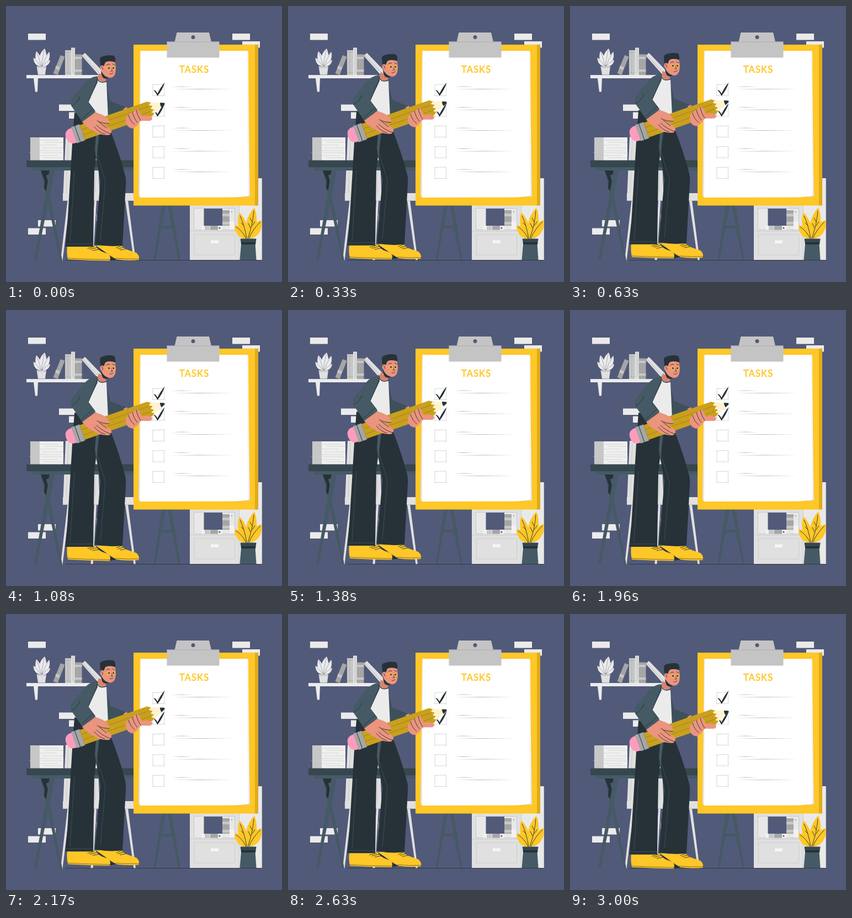
Recreate the animation shown at these times as an HTML page. Size 500 by 500 pixels, loop 3040 ms.

```html
<!DOCTYPE html>
<html lang="en">
<head>
<meta charset="utf-8">
<title>Tasks</title>
<style>
  html, body { margin: 0; width: 100%; height: 100%; overflow: hidden; background: #525a79; }
  svg { display: block; width: 100vw; height: 100vh; }
  .line { fill: none; stroke: #263238; stroke-width: .9; stroke-linecap: round; stroke-linejoin: round; }
  .seam { fill: none; stroke: #455a64; stroke-width: .7; }
  .title {
    font: 400 16.4px Lato, "Open Sans", sans-serif; letter-spacing: 1.2px;
    fill: #ffc727; stroke: #ffc727; stroke-width: .6; stroke-linejoin: round;
  }
</style>
</head>
<body>
<svg viewBox="0 0 500 500">
  <rect width="500" height="500" fill="#525a79"/>
  <g id="bricks" fill="#ebebeb"></g>

  <!-- Shelf -->
  <path fill="#ebebeb" d="M37 125H172V131H58L57 155.500H53L50 131H37Z"/>
  <path fill="#e0e0e0" d="M55.500 109H73L71 124.500H58Z"/>
  <path fill="#c7c7c7" d="M56 109H72.500L72 112H56.500Z"/>
  <g fill="#ebebeb">
    <path d="M64 109C57 97 60 86 70 77C76 89 72 99 64 109Z"/>
    <path d="M63 109C54 103 51 93 55 82C63 89 65 98 63 109Z"/>
    <path d="M66 109C67 98 71 90 78.500 83C81 94 77 103 66 109Z"/>
    <path d="M63 109C55 109 50 103 49.500 94C57 96 62 101 63 109Z"/>
    <path d="M66 109C68 102 72 98 80 98C79 105 74 110 66 109Z"/>
    <path fill="none" stroke="#8b90a3" stroke-width=".7" d="M64 108Q67 91 69 80M63 108Q60 93 56 85M66 108Q70 95 77 86M62 108Q57 100 51 96M67 108Q72 102 78 99"/>
  </g>
  <path fill="#a6a6a6" d="M85.500 122L99 89L106.500 92L93.500 125Z"/>
  <path fill="#c7c7c7" d="M107 80H118V125H107ZM91 108L98 111L96 116L89 113Z"/>
  <path fill="#e0e0e0" d="M118 75.500H125V125H118Z"/>
  <path fill="#a6a6a6" d="M124.500 87.500H137.500V125H124.500Z"/>
  <path fill="#c7c7c7" d="M124.500 92H137.500V96H124.500ZM124.500 115H137.500V119H124.500Z"/>
  <path fill="#e0e0e0" d="M137 90L143 85L175 118L172 125H168Z"/>
  <path fill="none" stroke="#a6a6a6" stroke-width=".7" d="M107 84H118M107 121H118M121.500 77V123M112 80V125M139 89L171 123"/>

  <!-- Chair -->
  <g fill="#e0e0e0">
    <path d="M108 237H165L170 353H103Z"/>
    <path d="M103 339H232V353H103Z"/>
    <path d="M111.500 352H116L102.500 461H99ZM216 352H221L235 461H231.500ZM160 352H164L157.500 461H153.500Z"/>
  </g>
  <path fill="none" stroke="#bdbdbd" stroke-width=".7" d="M113 240L109 339M103 352.500H231M162 300V338"/>
  <path fill="none" stroke="#e0e0e0" stroke-width=".6" d="M158 374Q167 376 164 390"/>

  <!-- Desk -->
  <path fill="#c7c7c7" d="M44 238H61V280H44Z"/>
  <path fill="#f0f0f0" d="M61 238H104V280H61Z"/>
  <path fill="none" stroke="#c7c7c7" stroke-width=".7" d="M62 243H96M70 247H104M61 252H92M66 257H104M61 262H100M64 266H105M61 271H95M68 275H104M42 265H50"/>
  <path fill="#455a64" d="M46 292H240V298H46ZM63 298H71L102 461H98Z"/>
  <path fill="#263238" d="M63 298H79L77 306H73L80 333L76 340L69 330L70 317Z"/>
  <path fill="#455a64" d="M79 298H88L55.500 461H51Z"/>
  <path fill="#37474f" d="M37 279.500H240V292H37Z"/>
  <path fill="#455a64" d="M284 350H291L271 461H267ZM291 350H298L316 461H312ZM276 398.500H308V403H276Z"/>

  <!-- Cabinet -->
  <path fill="#e0e0e0" d="M333 312H463.500V460H333Z"/>
  <path fill="#e9e9e9" d="M422.500 312H463.500V460H422.500Z"/>
  <path fill="#e8e8e8" stroke="#c0c0c0" stroke-width=".8" d="M340.500 366.500H414.500V405.500H340.500Z"/>
  <path fill="#525a79" d="M358.500 367H392V398H358.500Z"/>
  <path fill="#a6a6a6" d="M392 370H405V398H392Z"/>
  <path fill="#c7c7c7" d="M392 376H405V381H392ZM392 391H405V396H392ZM360 398H369V405.500H360Z"/>
  <path fill="#f2f2f2" d="M405 390H414V405H405ZM354 398H360V405.500H354ZM384 398H392V405.500H384Z"/>
  <path fill="#a6a6a6" d="M370 398H384V405.500H370Z"/>
  <circle cx="387" cy="402" r="1.600" fill="#525a79"/>
  <circle cx="409" cy="373" r="1" fill="#888"/>
  <path fill="none" stroke="#c7c7c7" stroke-width=".8" d="M422.500 360V460M341 414H414.500V451H341ZM333 408H422"/>
  <path fill="#f5f5f5" d="M371 424.500H385V430H371Z"/>

  <path stroke="#263238" stroke-width=".8" d="M107 460.500H463"/>

  <!-- Plant -->
  <g fill="#ffc727">
    <path d="M438 422C430 400 436 380 450 365C458 386 455 406 438 422Z"/>
    <path d="M436 422C420 408 417 389 423 374C435 386 440 402 436 422Z"/>
    <path d="M440 422C440 404 448 392 463.500 388C465 406 457 419 440 422Z"/>
    <path d="M436 422C422 422 414 411 414 397C428 399 436 408 436 422Z"/>
    <path class="line" d="M438 421Q447 397 449 371M436 421Q432 397 424 380M440 421Q447 404 461 391M435 421Q428 407 417 400M443 402L439 394M446 391L442 384M446 398L451 391M431 398L426 393"/>
  </g>
  <path fill="#455a64" d="M426 430H451.500L453.500 460H423.500Z"/>
  <path fill="#37474f" d="M424.500 421.500H453.500L452 432H426Z"/>
  <path fill="#263238" d="M426 428H452V432H426Z"/>

  <!-- Board -->
  <path fill="#deab1c" d="M450 70H457V361.500H450Z"/>
  <path fill="#ffc727" d="M231 70H451V361.500H231Z"/>
  <path fill="#e0e0e0" d="M243 82L438 81L442 345L424 346L240 344Z"/>
  <path fill="#f5f5f5" d="M243.500 81L439 82L440.500 342L424 345L242 347Z"/>
  <path fill="#fff" d="M244.500 82L436.500 81.500L438 344L415 346.500L243.500 347Z"/>
  <path fill="#c4c4c4" d="M309.500 48H368L372 65H305.500Z"/>
  <path fill="#c4c4c4" d="M291.500 64.500H386.500V93.500H291.500Z"/>
  <path stroke="#a6a6a6" stroke-width=".8" d="M291.500 65H386.500"/>
  <circle cx="339" cy="56.500" r="3.500" fill="#525a79"/>
  <text class="title" x="314" y="120.500">TASKS</text>
  <g id="rows"></g>

  <!-- Person -->
  <g id="person">
    <path fill="#263238" d="M160 434L182 446L201 459L188 461L170 448Z"/>
    <path fill="#ffc727" d="M163 434L208 432Q213 440 224 443L236 447Q243 453 240.500 460Q218 462 200 459Q190 454 180 446Z"/>
    <path fill="#ffc727" d="M111 434H162Q166 441 174 445L185 449Q191 453 188 461.500Q150 461 112 459Q109.500 447 111 434Z"/>
    <path class="line" style="stroke-width:.6" d="M111 457Q150 459 188 459.500M198 457Q220 459 241 458"/>
    <path class="line" stroke-width="1.300" d="M148 439L160 436M152 441L164 438M157 443L168 441M200 438L210 434M203 440L213 437M207 442L217 440"/>

    <path fill="#263238" d="M164 225L190 228Q206 269 215 304Q218 313 217 324L211 434Q186 437 161 432L171 318L162 265Z"/>
    <path fill="#263238" d="M124 193L186 199L190 232L168 234L160 300L158 436H107.500Q112 392 114 350L120 250Z"/>
    <path class="seam" d="M169 234L164 266L180 318L171 424M124 300L116 428M107 431H158"/>
    <path fill="#455a64" d="M163 234L168 233L164 282L161 260Z"/>

    <path fill="#3e515a" d="M180 137L189 172L216 183L221 191L205 202H182Z"/>
    <path fill="#e8927c" d="M213 186L219 183L222 192L214 196Z"/>
    <path fill="#ebebeb" d="M166 134L182 138L185 203L150 187L144 172Z"/>
    <path fill="#d9826e" d="M168 122L182 128L181 136Q175 141 165 132Z"/>
    <path class="line" style="stroke:#37474f;stroke-width:1.500" d="M165 132Q170 141 181 137"/>
    <path fill="#455a64" d="M165 127Q150 129 140 142L119 168Q115 175 119 182L139 211L162 191L149 174L166 138Z"/>
    <path class="line" d="M166 128L164 139L149 174L161 190M119 181Q129 176 134 164M137 205L157 187"/>

    <!-- Head -->
    <path fill="#eb947e" d="M173 101L197 99Q200 112 198 122Q195 131 187 130Q176 127 173 118Z"/>
    <path fill="#263238" d="M172 117Q177 128 186 130Q180 134 175 129Q172 123 172 117Z"/>
    <path fill="#263238" d="M171 109L170 96Q171 92 176 91Q185 88 195 90Q199 92 198 102Q186 98 180 102L177 109Z"/>
    <ellipse cx="174" cy="112" rx="3.500" ry="4.500" fill="#eb947e"/>
    <path class="line" d="M173 110Q176 111 175 115M188 123Q192 124 194 121M182 107Q185 104 188 106M193 105L197 107M191 113L193 118L190 118"/>
    <g fill="none" stroke="#f2bd2c" stroke-width="1">
      <circle cx="186" cy="113" r="3.600"/><circle cx="195" cy="113" r="3.200"/>
      <path d="M177 111L182 112"/>
    </g>
    <circle cx="186.500" cy="112.500" r="1.400" fill="#263238"/>
    <circle cx="194.500" cy="112.500" r="1.400" fill="#263238"/>

    <!-- Pencil -->
    <g transform="translate(260 186.500) rotate(-19.200)">
      <path fill="#ff9cbd" d="M-143 -14H-148Q-160 -13 -160 0T-148 14H-143Z"/>
      <path fill="#a6a6a6" d="M-145 -15.500H-129V15.500H-145Z"/>
      <path class="line" d="M-138 -15.500V15.500"/>
      <path fill="#fff3cf" d="M-2 -14L29 -1V1L-2 14Z"/>
      <path fill="#c9a01e" d="M-129 -14H0L6 -10L1 -7L7 -3L2 0L7 4L1 7L6 10L0 14H-129Z"/>
      <path fill="none" stroke="#a37f12" stroke-width=".8" d="M-129 -5H0M-129 5H0"/>
      <path fill="#263238" d="M21.500 -4.500L29 -1.500V1L21.500 4.500Q20 0 21.500 -4.500Z"/>
    </g>

    <!-- Hands -->
    <path fill="#eb947e" d="M138 210L161 193Q174 195 182 202Q188 208 188 213Q181 215 169 211Q183 217 190 224Q193 230 188 231Q191 233 185 234Q168 234 156 225Q144 219 138 210Z"/>
    <path class="line" d="M169 211L182 221M164 216Q174 226 188 231M160 219Q168 229 179 232M165 208Q174 213 187 213"/>
    <path fill="#eb947e" d="M217 209Q216 201 222 198Q225 192 230 193Q235 185 240 188L247 200Q257 197 264 201Q267 206 261 208H250Q243 207 241 212Q236 220 229 222Q218 220 217 209Z"/>
    <path class="line" stroke-width="1.200" d="M222 198Q225 209 233 215M229 193Q232 204 238 211M236 188Q238 199 244 207"/>
  </g>
</svg>
<script>
  const LOOP = 3040, RISE = 10;
  const byId = id => document.getElementById(id);

  byId("bricks").innerHTML = [[40, 50], [410, 50], [428, 64], [96, 178.5], [114, 192.5], [58, 388], [40, 402.5]]
    .map(([x, y]) => `<rect x="${x}" y="${y}" width="32" height="11.5"/>`).join("");

  const box = `<path fill="none" stroke="#c4c4c4" stroke-width=".7" d="M265.5 142.5L287 142M266 142V163.5M286.5 141.5V163M265.5 162.5H287.5"/>`;
  const rules = `<path fill="#b8b8b8" d="M300 146.3L318 145.5L339 146.2L318 146.5ZM299 150.7L350 150L413 150.6L350 151Z"/>`;
  const mark = `<path fill="#263238" d="M267.5 152.500Q270 151 274.500 158.500Q280 147 287.500 138.500Q284 151 274.500 163Q271 156 267.500 152.500Z"/>`;
  byId("rows").innerHTML = [0, 1, 2, 3, 4]
    .map(i => `<g transform="translate(0 ${i * 37.5})">${box}${rules}${i < 2 ? mark : ""}</g>`).join("");

  const person = byId("person");
  const start = performance.now();

  function draw(time) {
    const phase = (time % LOOP) / LOOP;
    const lift = RISE * (1 - Math.abs(1 - 2 * phase));
    person.setAttribute("transform", `translate(0 ${-lift})`);
  }

  function animate() {
    draw(performance.now() - start);
    requestAnimationFrame(animate);
  }
  animate();
</script>
</body>
</html>
```
